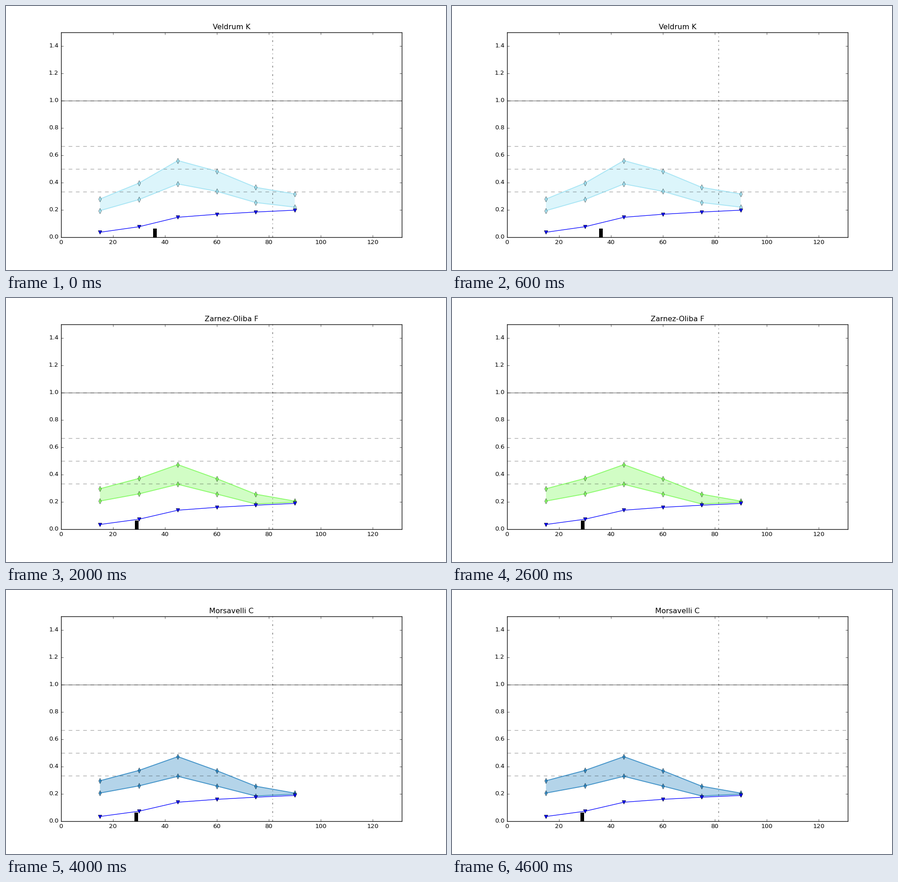
A matplotlib script that plays this animation: 966 by 580 pixels, repeating every 5 s.

```python
import matplotlib.pyplot as plt
import numpy as np
from matplotlib.animation import FuncAnimation

plt.style.use("classic")
plt.rcParams.update({
    "font.family": "DejaVu Sans",
    "font.size": 10,
    "figure.facecolor": "white",
    "savefig.facecolor": "white",
    "savefig.dpi": "figure",
})

DPI = 96
STEPS = np.arange(6)
X = 15 * (STEPS + 1)
TOP = np.array([0.258, 0.391, 0.591, 0.541, 0.433, 0.398])
BASE = np.array([0.036, 0.078, 0.150, 0.173, 0.190, 0.204])
REF_BAR = 42.8      # bar position at which TOP and BASE apply unchanged
BAR_HEIGHT = 0.062

# title, band colour, start and fade of the band, bar positions
SCENES = [
    ("Veldrum K", "#8edef2", 0.963, 0.032, [36.2]),
    ("Veldrum T", "#87b9f8", 1.0, 0.0, [REF_BAR]),
    ("Zarnez-Oliba F", "#69fa41", 0.935, 0.092, [29.1]),
    ("Baltorrez P (new)", "#cafc73", 0.895, 0.152, [19.15, 60.0]),
    ("Morsavelli C", "#0872b8", 0.935, 0.092, [29.0]),
]


def curves(start, fade, bar):
    """Upper and lower band edge, and the blue curve beneath them."""
    base = BASE * (bar / REF_BAR) ** 0.22
    top = TOP / (start + fade * STEPS) ** 2
    return (np.maximum(top, 1.08 * base),
            np.maximum(0.694 * top, 1.05 * base),
            base)


fig, ax = plt.subplots(figsize=(966 / DPI, 580 / DPI), dpi=DPI)
fig.subplots_adjust(left=0.125, right=0.9, bottom=0.125, top=0.9)
ax.set_xlim(0, 131.3)
ax.set_ylim(0, 1.5)
title = ax.set_title("")

# Reference lines
ax.axhline(1, color="k", alpha=0.5)
for level in (1 / 3, 1 / 2, 2 / 3, 1):
    ax.axhline(level, color="k", alpha=0.35, ls="--")
ax.axvline(81.4, color="k", alpha=0.6, ls="-.")

band, = ax.fill([0, 1, 1], [0, 0, 1], alpha=0.3, lw=0)
edges = [ax.plot([], [], marker="d", lw=1.5, alpha=0.7, mec="k")[0]
         for _ in range(2)]
curve, = ax.plot([], [], color="b", marker="v", mec="k")
bars = ax.vlines([], 0, BAR_HEIGHT, colors="k", lw=6, zorder=2.4)


def draw(i):
    name, color, start, fade, marks = SCENES[i]
    upper, lower, base = curves(start, fade, marks[0])

    title.set_text(name)
    band.set_xy(np.column_stack([np.r_[X, X[::-1]],
                                 np.r_[upper, lower[::-1]]]))
    band.set_color(color)
    for line, y in zip(edges, (upper, lower)):
        line.set_data(X, y)
        line.set_color(color)
        line.set_markerfacecolor(color)
    curve.set_data(X, base)
    bars.set_segments([[(x, 0), (x, BAR_HEIGHT)] for x in marks])
    return title, band, *edges, curve, bars


anim = FuncAnimation(fig, draw, frames=len(SCENES), interval=1000,
                     init_func=lambda: draw(0), repeat=True, repeat_delay=0)
plt.show()
```
